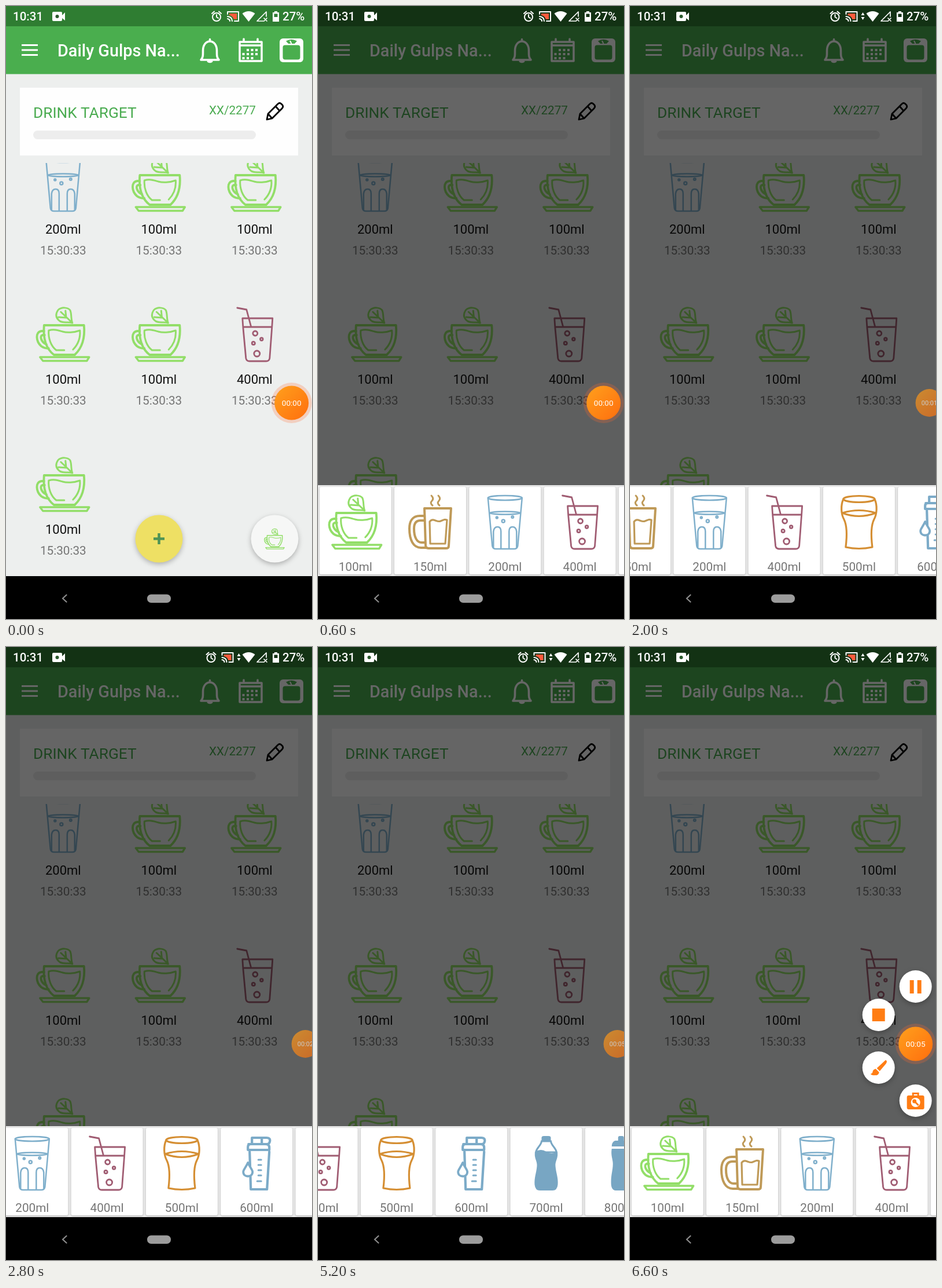
An HTML page that plays this animation: 529 px wide and 1058 px high, repeating every 6.8 s.

```html
<!DOCTYPE html>
<html lang="en">
<head>
<meta charset="utf-8">
<title>Drink tracker</title>
<style>
  html, body { margin: 0; width: 100%; height: 100%; overflow: hidden; background: #000; }
  svg { display: block; width: 100%; height: 100%; }
  text { font-family: Roboto, sans-serif; }
  .mid { text-anchor: middle; }
  .line { fill: none; stroke-linecap: round; stroke-linejoin: round; }
  .amount { font-size: 22px; fill: #111; }
  .time { font-size: 20.7px; fill: #757575; }
  .lift { filter: drop-shadow(0 3px 4px #0004); }
  .card { filter: drop-shadow(0 1px 1.5px #0004); }
</style>
</head>
<body>
<svg viewBox="0 0 529 1058" preserveAspectRatio="none">
  <defs>
    <linearGradient id="orange" x1="0" y1="0" x2="1" y2="1">
      <stop offset="0" stop-color="#ffa01c"/><stop offset="1" stop-color="#ff6e0e"/>
    </linearGradient>
    <clipPath id="gridClip"><path d="M0 271H529V984H0Z"/></clipPath>

    <!-- Drinks: centred on x = 0, 94 px tall -->
    <g id="cup" class="line" stroke="#92de68" stroke-width="3.8">
      <path stroke-width="3" d="M-9 5C-3-1 8 0 12 5 15 11 13 20 16 27 9 24-2 29-8 22-13 17-13 11-9 5ZM-4 8 16 27M4 6 5 16M-8 17 6 18"/>
      <path d="M-33 31H36C38 52 33 70 20 82H-16C-29 72-35 54-33 31Z"/>
      <path d="M-33 41H-37C-49 42-47 59-38 67-34 70-29 71-25 71M-32 48H-36C-41 50-38 60-29 64"/>
      <path stroke-width="3" d="M-25 40C-16 37-8 40-1 42S18 44 29 40M-25 40C-26 54-21 67-12 74H2M29 40C30 53 25 65 17 73"/>
      <path stroke-width="3.4" d="M-40 86H45L41 92.500H-35Z"/>
    </g>
    <g id="mug" class="line" stroke="#bf9a58" stroke-width="4">
      <path stroke-width="3" d="M2 1Q7 6 3 10T4 18M14 1Q19 6 15 10T16 18"/>
      <path d="M-10 23H36L32 88Q32 92 27 92H-3Q-8 92-8 87Z"/>
      <path d="M-10 36H-18C-31 36-36 46-36 58-36 78-29 91-16 91H-6M-10 44H-17C-25 44-28 50-28 58-28 73-23 82-15 82H-9"/>
      <path stroke-width="3.2" d="M-1 46C5 38 11 48 18 45S25 42 29 43L26 84H0Z"/>
    </g>
    <g id="glass" class="line" stroke="#7fafcb" stroke-width="2.500">
      <ellipse cy="5" rx="29.500" ry="4"/><ellipse cy="31" rx="26" ry="2.500"/>
      <path d="M-29.500 5-22 88Q-21 93-16 93H16Q21 93 22 88L29.500 5"/>
      <path d="M-20 90V63Q-19 55-13 55T-7 63V92M20 90V63Q19 55 13 55T7 63V92"/>
      <circle cx="-14" cy="39" r="1.500"/><circle cx="-3" cy="45" r="2.500"/><circle cx="13" cy="38" r="1.800"/>
    </g>
    <g id="soda" class="line" stroke="#a05c72" stroke-width="2.800">
      <path d="M-30 1-14 4-6 34M-21 19H31L30 34H-20ZM-20 34-15 88Q-14 93-9 93H20Q25 93 26 88L30 34"/>
      <circle cx="1" cy="45" r="4"/><circle cx="12" cy="55" r="2.300"/><circle cx="-2" cy="62" r="2.600"/><circle cx="4" cy="80" r="5"/>
    </g>
    <g id="pint" class="line" stroke="#d58f34" stroke-width="3.200">
      <ellipse cy="7" rx="27" ry="5.500"/>
      <path d="M-27 7C-32 18-31 33-26 42-20 54-21 74-23 90Q0 95 23 90C21 74 20 54 26 42 31 33 32 18 27 7M-29 31Q0 22 29 31M-29 31Q0 42 29 31"/>
    </g>
    <g id="shaker" class="line" stroke="#7cabc8" stroke-width="4.200">
      <path d="M-8 3H17Q24 3 23 9T16 14H11M-8 3V13M9 4V13M-14 14H16Q22 14 22 20V24H-15V19Q-15 14-10 14"/>
      <path d="M-12 27-10 92H18L22 27"/>
      <path fill="#fff" stroke-width="3.800" d="M-15 46C-19 55-23 58-23 62-23 72-7 72-7 62-7 58-11 55-15 46Z"/>
      <path stroke-width="3" d="M3 41H8M3 50H8M3 59H8M3 68H8M1 78H8"/>
    </g>
    <g id="bottle" fill="#78a6c3">
      <path d="M-8 9V3Q-8 0-4 0H4Q8 0 8 3V9Z"/>
      <path fill="#fff" stroke="#78a6c3" stroke-width="3" d="M-8 9H8C9 17 16 19 18 28H-18C-16 19-9 17-8 9Z"/>
      <path d="M-19 27Q-9 21 0 27T19 27C22 37 15 43 16 52 17 64 21 72 20 84Q19 94 11 94H-11Q-19 94-20 84C-21 72-17 64-16 52-15 43-22 37-19 27Z"/>
    </g>
    <g id="sport" fill="#78a6c3">
      <path d="M-5 8V3Q-5 0-2 0H2Q5 0 5 3V8H10Q16 10 16 18H-16Q-16 10-10 8Z"/>
      <path d="M-16 22H16C18 34 14 40 14 48 14 60 18 68 17 84Q16 94 9 94H-9Q-16 94-17 84C-18 68-14 60-14 48-14 40-18 34-16 22Z"/>
    </g>
  </defs>

  <path fill="#edefee" d="M0 0H529V984H0Z"/>
  <path fill="#4aae4e" d="M0 35H529V117.500H0Z"/>
  <path fill="#2f7d32" d="M0 0H529V35H0Z"/>
  <g class="line" stroke="#fff" stroke-width="3">
    <path stroke-linecap="butt" stroke-width="2.800" d="M27 67.500H55M27 76H55M27 84.500H55"/>
    <path stroke-width="3.600" d="M337 93H368C364 89 364.500 84 364.500 77 364.500 67 359 61 352.500 61S340.500 67 340.500 77C340.500 84 341 89 337 93ZM352.500 60V57.500"/>
    <path fill="#fff" d="M349 95.500H356Q352.500 98 349 95.500Z"/>
    <path stroke-width="3.500" d="M404 62H442V95H404ZM405 68H441M411 57V62M435 57V62"/>
    <path stroke-width="4" stroke-dasharray="4 3.500" stroke-linecap="butt" d="M416 76H438M408.500 83H438M408.500 90H431"/>
  </g>
  <rect x="473" y="56" width="41" height="41" rx="6" fill="#fff"/>
  <path fill="#4aae4e" d="M484 60.500Q493.500 55 503 60.500L499 65H488Z"/>
  <path stroke="#fff" stroke-width="2" d="M493.500 65 491 60"/>
  <rect x="478.500" y="67.500" width="30" height="25" rx="4" fill="#4aae4e"/>
  <text x="89" y="87" font-size="28.8" font-weight="500" fill="#fff">Daily Gulps Na...</text>

  <path fill="#fefefe" d="M24 141H505V258H24Z"/>
  <text x="47" y="193" font-size="26.3" fill="#4aab50">DRINK TARGET</text>
  <text x="432" y="187" font-size="20.7" text-anchor="end" fill="#4aab50">XX/2277</text>
  <rect x="47" y="215" width="385" height="15" rx="7.500" fill="#ededed"/>
  <path class="line" stroke="#000" stroke-width="2.800" d="M451 196 453 186 470 169Q473 166 476 169L478 171Q480 174 477 177L460 194ZM466 173 473 181M453 186 460 194"/>

  <g id="grid" clip-path="url(#gridClip)"></g>
  <g class="lift"><circle cx="264.500" cy="919.500" r="41" fill="#eee064"/></g>
  <path stroke="#4e9455" stroke-width="4.500" d="M255 919.500H274M264.500 910V929"/>
  <g class="lift"><circle cx="464.500" cy="919.500" r="41" fill="#f6f7f6"/></g>
  <use href="#cup" transform="translate(464 902) scale(.38)"/>

  <path id="dim" d="M0 0H529V984H0Z"/>

  <g fill="#fff">
    <text x="12" y="25" font-size="20.5" font-weight="500">10:31</text>
    <text x="478" y="25" font-size="20.5" font-weight="500">27%</text>
    <path d="M82 10H95Q97 10 97 12V16L102 11V25L97 21V24Q97 26 95 26H82Q80 26 80 24V12Q80 10 82 10Z"/>
    <circle cx="88.500" cy="18" r="3" fill="#2a5a2c"/>
    <g id="alarm" class="line" stroke="#fff" stroke-width="2">
      <circle cx="364" cy="19" r="7"/><path d="M364 15V19L367 21M356 13 360 9.500M372 13 368 9.500"/>
      <path d="M383 14V10H402V26H395"/><path fill="#ff5a3c" stroke="none" d="M386 13H399V23H394Q392 17 386 16Z"/>
      <path d="M383 18Q391 19 391 26M383 22Q387 23 387 26"/>
    </g>
    <path id="arrows" d="M399.500 16 402.500 11 405.500 16ZM399.500 19H405.500L402.500 24Z"/>
    <path d="M408.500 13Q419.500 5 430.500 13L419.500 27Z"/>
    <path class="line" stroke="#fff" stroke-width="1.700" d="M445 26H434L450 10V18M446 21 451 26M451 21 446 26"/>
    <path fill-rule="evenodd" d="M464 9H469V11H472V27H461V11H464ZM463.500 13.500V19H469.500V13.500Z"/>
  </g>

  <g id="sheet">
    <path fill="#ebebeb" d="M0 827H529V984H0Z"/>
    <g id="cards"></g>
  </g>
  <path d="M0 984H529V1058H0Z"/>
  <path class="line" stroke="#8d8d8d" stroke-width="2.200" d="M104.500 1016.500 98 1022.500 104.500 1028.500"/>
  <rect x="244" y="1015.500" width="41" height="14.500" rx="7" fill="#9c9c9c"/>

  <g id="menu"></g>
  <g id="timer">
    <circle id="halo" r="35" fill="#ff6a30" opacity=".24"/>
    <circle r="29.500" fill="url(#orange)"/>
    <text id="clock" class="mid" y="5" font-size="13.6" fill="#fff"></text>
  </g>
</svg>
<script>
const LOOP = 6800, STEP = 200, PITCH = 129.3;
const $ = id => document.getElementById(id);
const pose = (id, x, y, scale = 1) => $(id).setAttribute('transform', `translate(${x} ${y}) scale(${scale})`);

const amounts = { cup: 100, mug: 150, glass: 200, soda: 400, pint: 500, shaker: 600, bottle: 700, sport: 800 };
const log = ['glass', 'cup', 'cup', 'cup', 'cup', 'soda', 'cup'];

$('grid').innerHTML = log.map((kind, i) => `
  <g transform="translate(${98.8 + i % 3 * 165.5} ${261 + Math.floor(i / 3) * 259})">
    <use href="#${kind}"/>
    <text class="mid amount" y="132">${amounts[kind]}ml</text>
    <text class="mid time" y="168">15:30:33</text>
  </g>`).join('');

$('cards').innerHTML = Object.entries(amounts).map(([kind, ml], i) => `
  <g transform="translate(${64.7 + i * PITCH} 844)">
    <rect class="card" x="-62" y="-14" width="124" height="151" rx="3" fill="#fff"/>
    <use href="#${kind}"/>
    <text class="mid time" y="131">${ml}ml</text>
  </g>`).join('');

// Recorder buttons: resting offset from the timer, and icon
const buttons = [
  [0, -99, '<path d="M-10-11H-3V12H-10ZM3-11H10V12H3Z"/>'],
  [-64, -50, '<path d="M-11-11H11V11H-11Z"/>'],
  [-64, 41, '<path d="M12-13Q16-12 13-7L2 6-3 1ZM-5 2 1 8Q0 14-6 13-11 14-14 11-10 10-10 6-9 3-5 2Z"/>'],
  [0, 98, `<path d="M-6-9V-14H6V-9H12Q15-9 15-6V12Q15 15 12 15H-12Q-15 15-15 12V-6Q-15-9-12-9ZM-3-9H3V-11H-3Z"/>
    <circle cy="3" r="8" fill="#fff"/><path stroke="#ff7d14" stroke-width="3" d="M-3 0 5 8"/><circle cx="-2" cy="1" r="3.500"/>`]
];
$('menu').innerHTML = buttons.map(([, , icon], i) => `
  <g id="button${i}"><circle class="lift" r="28" fill="#fff"/><g fill="#ff7d14">${icon}</g></g>`).join('');

// Value of a piecewise linear track of [time, value] points
function at(track, t) {
  const next = track.findIndex(([time]) => time > t);
  if (next === 0) return track[0][1];
  if (next < 0) return track[track.length - 1][1];
  const [t0, v0] = track[next - 1], [t1, v1] = track[next];
  return v0 + (v1 - v0) * (t - t0) / (t1 - t0);
}

const opening = [[200, 0], [400, .7], [600, 1]];
const scroll = [[1000, 0], [1400, 70], [2000, 186], [2800, 278], [3200, 390], [3600, 500], [3800, 506],
  [4600, 506], [5000, 490], [5200, 446], [5600, 150], [5800, 45], [6000, 4], [6200, 0]];
const docking = [[1200, 0], [1400, 1], [6000, 1], [6200, 0]];
const fanning = [[6200, 0], [6400, .65], [6600, 1]];

function draw(t) {
  const open = at(opening, t), dock = at(docking, t), fan = at(fanning, t);
  $('dim').setAttribute('opacity', .6 * open);
  pose('sheet', 0, 157 * (1 - open));
  pose('cards', -at(scroll, t), 0);

  const busy = t >= 1000;
  pose('alarm', busy ? -9.5 : 0, 0);
  $('arrows').setAttribute('visibility', busy ? 'visible' : 'hidden');

  pose('timer', 493.7 + 23.8 * dock, 685, 1 - .19 * dock);
  $('timer').setAttribute('opacity', 1 - .32 * dock);
  $('halo').setAttribute('opacity', .24 * (1 - dock));
  $('clock').textContent = '00:0' + Math.min(5, Math.max(0, Math.floor((t - 200) / 1000)));

  $('menu').setAttribute('visibility', fan ? 'visible' : 'hidden');
  buttons.forEach(([x, y], i) => pose('button' + i, 493.7 + x * fan, 685 + y * fan));
}

let shown = -1;
function tick() {
  const t = Math.floor(performance.now() % LOOP / STEP) * STEP;
  if (t !== shown) draw(shown = t);
  requestAnimationFrame(tick);
}
tick();
</script>
</body>
</html>
```
